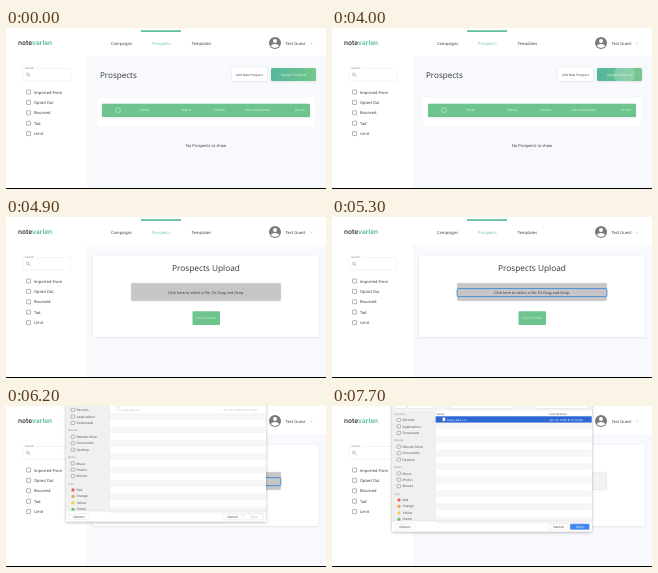
Write an HTML page that moves like this. It is 320 px wide and 161 px high and loops after 8 s.

```html
<!DOCTYPE html>
<html lang="en">
<head>
<meta charset="utf-8">
<title>Prospects upload</title>
<style>
  html, body { margin: 0; width: 100%; height: 100%; overflow: hidden; background: #fff; }
  svg { display: block; width: 100vw; height: 100vh; }
  text { font-family: "Open Sans", "Noto Sans", sans-serif; text-rendering: geometricPrecision; fill: #2f3337; }
  .sheet text { font-family: Inter, "Liberation Sans", sans-serif; }
</style>
</head>
<body>
<svg id="stage" viewBox="0 0 320 161">
  <defs>
    <linearGradient id="mint"><stop stop-color="#54b69b"/><stop offset="1" stop-color="#76c78b"/></linearGradient>
    <filter id="soft" x="-10%" y="-20%" width="120%" height="140%">
      <feDropShadow dx="0" dy=".6" stdDeviation="1" flood-color="#555b70" flood-opacity=".16"/>
    </filter>
    <filter id="deep" x="-10%" y="-10%" width="120%" height="120%">
      <feDropShadow dx="0" dy="1" stdDeviation="1.4" flood-opacity=".3"/>
    </filter>
    <clipPath id="uploadClip"><rect x="265" y="40" width="45" height="13" rx="1.5"/></clipPath>
  </defs>
</svg>
<script>
const stage = document.getElementById("stage");
const GREEN = "#6ec48d", DARK = "#2f3337";

function add(parent, tag, attrs, content) {
  const el = document.createElementNS("http://www.w3.org/2000/svg", tag);
  for (const key in attrs) el.setAttribute(key, attrs[key]);
  if (content) el.textContent = content;
  return parent.appendChild(el);
}
const group = (parent, attrs = {}) => add(parent, "g", attrs);
const rect = (parent, x, y, width, height, fill, more = {}) =>
  add(parent, "rect", { x, y, width, height, fill, ...more });
const label = (parent, x, y, size, str, fill = DARK, more = {}) =>
  add(parent, "text", { x, y, "font-size": size, style: `fill:${fill}`, ...more }, str);
const line = (parent, d, stroke, width = .5) =>
  add(parent, "path", { d, stroke, "stroke-width": width, fill: "none" });
const middle = { "text-anchor": "middle" };

// Page frame
rect(stage, 0, 0, 320, 161, "#fff");
rect(stage, 81, 28, 239, 132, "#f8f9fd");

function drawHeader() {
  const bold = { "font-weight": 600, style: "font-family:Inter,sans-serif;fill:#34383c" };
  const logo = add(stage, "text", { x: 12, y: 17.2, "font-size": 6.6, ...bold });
  add(logo, "tspan", {}, "note");
  add(logo, "tspan", { fill: "#55b896" }, "varlen");
  rect(stage, 135, 2.3, 40, 1.6, "#55b896");
  label(stage, 105, 16.6, 4.1, "Campaigns");
  label(stage, 146, 16.6, 4.1, "Prospects", "#65bf9b");
  label(stage, 185.5, 16.6, 4.1, "Templates");
  add(stage, "circle", { cx: 269, cy: 15, r: 6, fill: "#77797b" });
  add(stage, "circle", { cx: 269, cy: 13, r: 2, fill: "#fff" });
  add(stage, "path", { d: "M265 18.6Q265 16 269 16T273 18.6Q269 21.4 265 18.6Z", fill: "#fff" });
  label(stage, 279.5, 16.6, 4.1, "Test Guest");
  line(stage, "M304 14.6l1.2 1.2l1.2-1.2", "#999", .4);
}

function drawFilters() {
  rect(stage, 17, 40.5, 48, 12.5, "none", { stroke: "#e9e9eb", "stroke-width": .5, rx: 1 });
  rect(stage, 18.5, 39, 11.5, 3, "#fff");
  label(stage, 19.3, 41.3, 2.8, "Search", "#777");
  add(stage, "circle", { cx: 21.8, cy: 46.4, r: 1.3, fill: "none", stroke: "#777", "stroke-width": .45 });
  line(stage, "M22.8 47.4l1.6 1.6", "#777");
  ["Imported From", "Opted Out", "Bounced", "Tad", "Limit"].forEach((name, i) => {
    const y = 64 + i * 10.4;
    rect(stage, 20.6, y - 2, 4, 4, "none", { stroke: "#777", "stroke-width": .55, rx: .4 });
    label(stage, 28, y + 1.5, 4, name);
  });
}

function drawList() {
  const g = group(stage);
  label(g, 94, 49.6, 8.1, "Prospects");
  rect(g, 226, 40, 35, 13, "#fff", { rx: 1.5, filter: "url(#soft)" });
  label(g, 243.5, 47.7, 3.15, "Add New Prospect", DARK, middle);
  rect(g, 265, 40, 45, 13, "url(#mint)", { rx: 1.5, filter: "url(#soft)" });
  const clip = group(g, { "clip-path": "url(#uploadClip)" });
  const ripple = add(clip, "circle", { cx: 292.5, cy: 46.5, r: 10.5, fill: "#fff", opacity: .22 });
  label(g, 287.5, 47.7, 3.15, "Upload Prospects", "#f0faf4", middle);
  rect(g, 91, 69.5, 218, 28.5, "#fff", { rx: 1.5 });
  rect(g, 96, 75.7, 208, 13.2, GREEN, { rx: 1, filter: "url(#soft)" });
  rect(g, 109.8, 80, 4.4, 4.4, "none", { rx: 1.6, stroke: "#d9f0e1", "stroke-width": .6 });
  const columns = { Email: 134, Status: 175, Owner: 208.3, "Last Contacted": 239, Enroll: 289.3 };
  for (const name in columns) label(g, columns[name], 83.4, 3.55, name, "#e2f4e8");
  label(g, 200, 119.3, 4, "No Prospects to show", DARK, middle);
  return { g, ripple };
}

function drawUpload() {
  const g = group(stage);
  rect(g, 87, 39, 225.5, 81, "#fff", { rx: 1.5, filter: "url(#soft)" });
  label(g, 200, 53.6, 8.3, "Prospects Upload", DARK, middle);
  const zone = rect(g, 125.3, 66.3, 149.4, 17.4, "#f3f3f5", { rx: 1, "stroke-width": .5 });
  const focus = rect(g, 125.2, 71.6, 149.6, 8, "none", { rx: .8, stroke: "#4d8fdb", "stroke-width": 1 });
  label(g, 200, 76.7, 3.75, "Click here to select a file. Or Drag and Drop.", DARK, middle);
  rect(g, 186.5, 94.3, 27.5, 13.7, GREEN, { rx: 1 });
  label(g, 200.2, 102.4, 3.6, "Import Data", "#c9ead4", middle);
  return { g, zone, focus };
}

function drawSheet() {
  const g = group(stage, { class: "sheet" });
  rect(g, 60, -20, 200, 145.5, "#fff", { rx: 1.2, filter: "url(#deep)" });
  rect(g, 60, -20, 200, 24.5, "#f4f4f4");
  for (const [x, w] of [[62, 12], [76, 25], [118, 62], [204, 52]])
    rect(g, x, -4, w, 6.5, "#fff", { rx: 1, stroke: "#d2d2d2", "stroke-width": .4 });
  rect(g, 60, 4.5, 43.5, 110.5, "#f0f0f1");

  const places = [
    [8.2, "Favorites"], [14, "Recents", 1], [20.5, "Applications", 1], [27, "Downloads", 1],
    [34.4, "Remote"], [40.8, "Remote Store", 1], [47.3, "Documents", 1], [53.8, "Desktop", 1],
    [61.2, "Media"], [67.5, "Music", 1], [73.8, "Photos", 1], [80.3, "Movies", 1],
    [87.7, "Tags"], [93.9, "Red", "#e8605c"], [100.3, "Orange", "#f0a04b"],
    [106.8, "Yellow", "#f2ce4a"], [113.3, "Green", "#62c466"]
  ];
  for (const [y, name, mark] of places) {
    if (!mark) { label(g, 62, y + 1, 2.6, name, "#929292"); continue; }
    if (mark === 1) rect(g, 65, y - 1.7, 3.6, 3.2, "none", { rx: .6, stroke: "#777", "stroke-width": .45 });
    else add(g, "circle", { cx: 67, cy: y, r: 1.6, fill: mark });
    label(g, 70.5, y + 1.1, 3.2, name, "#555");
  }

  line(g, "M103.5 4.5V115", "#dedede", .4);
  label(g, 105, 8.6, 2.6, "Name", "#555");
  label(g, 217.5, 8.6, 2.6, "Date Modified", "#555");
  line(g, "M103.5 10H260", "#e3e3e3", .4);
  for (let y = 17; y < 113; y += 13.4) rect(g, 103.7, y, 156, 6.7, "#f6f6f7");
  const row = rect(g, 103.7, 10.3, 156, 6.3, "#2c67d3");
  const icon = rect(g, 110.7, 11.8, 2.4, 3.2, "#fff", { stroke: "#aaa", "stroke-width": .3 });
  const texts = [label(g, 115, 14.5, 2.8, "email_data.csv"), label(g, 217.5, 14.5, 2.8, "Apr 20, 2020 at 10:10 AM")];

  line(g, "M60 115H260", "#d9d9d9", .5);
  const button = (x, w, name) => {
    const box = rect(g, x, 117.8, w, 6, "#fff", { rx: 1.2, stroke: "#d4d4d4", "stroke-width": .4 });
    return [box, label(g, x + w / 2, 122, 3.2, name, "#444", middle)];
  };
  button(63, 20, "Options");
  button(217, 19, "Cancel");
  const open = button(238, 19.5, "Open");
  return { g, row, icon, texts, open };
}

drawHeader();
drawFilters();
const list = drawList(), upload = drawUpload(), sheet = drawSheet();
rect(stage, 0, 160, 320, 1, "#000");

const LOOP = 8000;
const slide = [[6000, -70], [6100, -36], [6200, -10], [6400, 0]];
const show = (el, on) => el.setAttribute("visibility", on ? "inherit" : "hidden");
const paint = (el, fill) => el.style.fill = fill;

function render(t) {
  show(list.g, t < 4100);
  show(list.ripple, t >= 4000);
  show(upload.g, t >= 4100);
  const hover = t >= 4900 && t < 6400;
  paint(upload.zone, hover ? "#c8c5c6" : "#f3f3f5");
  upload.zone.style.stroke = hover ? "#c0bdbe" : "#dddde0";
  show(upload.focus, t >= 5300 && t < 6400);

  show(sheet.g, t >= 6000);
  const step = slide.filter(([at]) => t >= at).pop();
  if (step) sheet.g.setAttribute("transform", `translate(0 ${step[1]})`);
  const picked = t >= 7700;
  show(sheet.row, picked);
  sheet.texts.forEach(el => paint(el, picked ? "#fff" : t >= 6700 ? "#444" : "#bbb"));
  sheet.icon.setAttribute("opacity", t >= 6700 ? 1 : .5);
  paint(sheet.open[0], picked ? "#3f84f3" : "#fff");
  paint(sheet.open[1], picked ? "#fff" : "#bbb");
}

function tick() {
  render(performance.now() % LOOP);
  requestAnimationFrame(tick);
}
tick();
</script>
</body>
</html>
```
